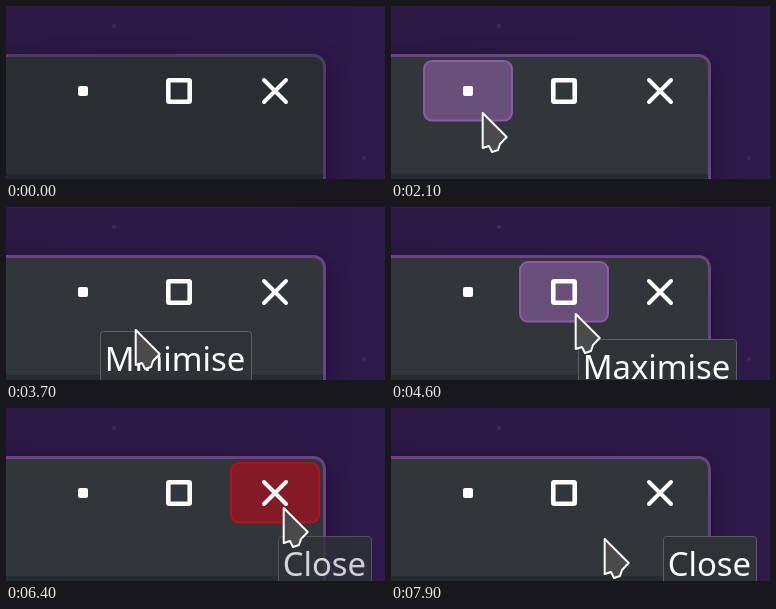
An HTML page that plays this animation: 379x173 px, repeating every 8 s.

```html
<!DOCTYPE html>
<html lang="en">
<head>
<meta charset="utf-8">
<title>Window buttons</title>
<style>
html, body { margin: 0; width: 100%; height: 100%; overflow: hidden; background: #2b1946; }
svg { display: block; }
text { font: 32.9px "Noto Sans", sans-serif; fill: #fcfcfc; }
.hover { stroke-width: 2; fill: #68507b; stroke: #8e58ac; }
.hover:last-child { fill: #851a27; stroke: #b80f1c; }
.tip rect { fill: #2e3337; stroke: #5b5f63; }
</style>
</head>
<body>
<svg width="379" height="173" viewBox="0 0 379 173">
  <defs>
    <linearGradient id="sky">
      <stop offset="0" stop-color="#2d1945"/>
      <stop offset="1" stop-color="#2e1a4b"/>
    </linearGradient>
    <linearGradient id="arrow" x2="0" y2="1">
      <stop offset="0" stop-color="#4d4747"/>
      <stop offset="1" stop-color="#4a4c4e"/>
    </linearGradient>
    <filter id="blur" x="-20%" y="-30%" width="140%" height="160%"><feGaussianBlur stdDeviation="11"/></filter>
  </defs>
  <rect width="379" height="173" fill="url(#sky)"/>
  <g fill="#49386a" opacity=".5"><circle cx="108" cy="20" r="2"/><circle cx="358" cy="152" r="2"/></g>
  <rect x="-60" y="56" width="380" height="240" rx="12" fill="#120a20" opacity=".6" filter="url(#blur)"/>
  <rect id="frame" x="-20" y="49.5" width="338.5" height="200" rx="11" stroke-width="3"/>
  <rect y="168" width="317" height="5" fill="#1c1f22" opacity=".45"/>
  <g id="hovers"></g>
  <rect x="72" y="80" width="10" height="10" rx="2" fill="#fcfcfc"/>
  <g fill="none" stroke="#fcfcfc" stroke-linecap="round">
    <rect x="162.3" y="74.3" width="21.4" height="21.4" rx="1" stroke-width="4.6"/>
    <path d="M258 74l22 22m0-22l-22 22" stroke-width="4"/>
  </g>
  <g id="tips"></g>
  <path id="cursor" d="M.7 1L24.7 25 18 32 16 38 10 40 7 34 .7 36Z" fill="url(#arrow)" stroke="#fcfcfc" stroke-width="2" stroke-linejoin="round"/>
</svg>
<script>
const LOOP = 8000, STEP = 100, PITCH = 96;
const $ = id => document.getElementById(id);

// The pointer enters, the tooltip shows, the pointer leaves.
const buttons = [
  { label: "Minimise", x: 94.5, y: 124.5, w: 151, enter: 1600, show: 2700, leave: 3300 },
  { label: "Maximise", x: 187.5, y: 132.5, w: 158, enter: 4000, show: 4220, leave: 5500 },
  { label: "Close", x: 272.5, y: 128.5, w: 93, enter: 6100, show: 6320, leave: 7400 }
];
// Each move is a curve from the last resting point, bent towards a control point.
const start = [-20, 176];
const moves = [
  { from: 650, until: 2100, via: [82, 148], to: [91, 106] },
  { from: 3200, until: 4600, via: [137, 139], to: [184, 106] },
  { from: 5400, until: 6400, via: [236, 145], to: [277, 99] },
  { from: 7300, until: 7900, via: [250, 122], to: [213, 130] }
];

const ramp = (t, a, length) => Math.min(1, Math.max(0, (t - a) / length));
const mix = (a, b, k) => `rgb(${a.map((v, i) => v + (b[i] - v) * k)})`;
const easeOut = k => 1 - (1 - k) ** 1.2;

$("hovers").innerHTML = buttons.map((b, i) =>
  `<rect class="hover" x="${33 + i * PITCH}" y="55" width="88" height="59.6" rx="8"/>`).join("");
$("tips").innerHTML = buttons.map(b =>
  `<g class="tip" transform="translate(${b.x} ${b.y})">
    <rect width="${b.w}" height="60" rx="3"/><text x="4.2" y="39.5">${b.label}</text>
  </g>`).join("");

function pointerAt(t) {
  return moves.reduce((pos, { from, until, via, to }) => {
    const k = easeOut(ramp(t, from, until - from));
    return pos.map((p, i) => (1 - k) ** 2 * p + 2 * k * (1 - k) * via[i] + k * k * to[i]);
  }, start);
}

function draw(now) {
  const t = Math.floor(now % LOOP / STEP) * STEP;
  const active = ramp(t, 100, 200);
  $("frame").setAttribute("fill", mix([42, 46, 50], [49, 54, 59], active));
  $("frame").setAttribute("stroke", mix([78, 60, 100], [106, 68, 130], active));
  buttons.forEach(({ enter, show, leave }, i) => {
    $("hovers").children[i].setAttribute("opacity", ramp(t, enter, 300) - ramp(t, leave, 300));
    $("tips").children[i].setAttribute("opacity", ramp(t, show, 100) - ramp(t, leave + 600, 200));
  });
  $("cursor").setAttribute("transform", `translate(${pointerAt(t)})`);
  requestAnimationFrame(draw);
}
requestAnimationFrame(draw);
</script>
</body>
</html>
```
